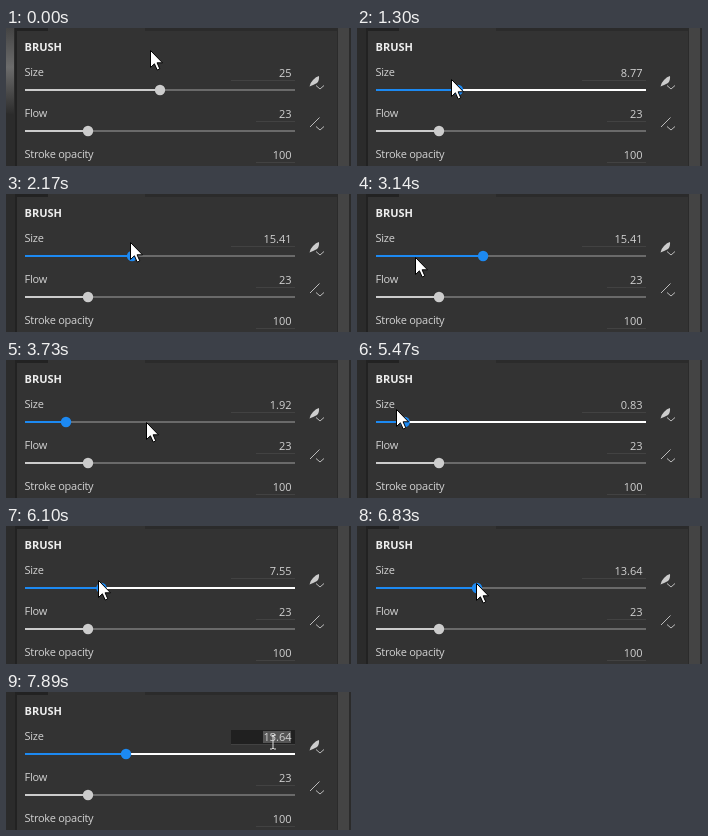
An HTML page for the animation above (8 s loop, 345x138 px).

```html
<!DOCTYPE html>
<html lang="en">
<head>
<meta charset="utf-8">
<title>Brush panel</title>
<style>
html, body { margin: 0; width: 100%; height: 100%; overflow: hidden; background: #333; }
svg { display: block; }
text { font: 11px "Open Sans", "Noto Sans", sans-serif; fill: #d2d2d2; }
.label { letter-spacing: -.25px; }
.title { font-weight: 700; fill: #eee; }
.value { text-anchor: end; }
.line { fill: none; stroke: #bbb; }
</style>
</head>
<body>
<svg width="345" height="138" viewBox="0 0 345 138">
  <defs>
    <linearGradient id="glow" x2="0" y2="1">
      <stop offset="0" stop-color="#444"/>
      <stop offset=".45" stop-color="#6c6c6c"/>
      <stop offset="1" stop-color="#2b2b2b"/>
    </linearGradient>
  </defs>
  <rect width="345" height="138" fill="#333"/>
  <rect width="9" height="138" fill="#2b2b2b"/>
  <path id="view" d="M0 0h8v87l-8-2z" fill="url(#glow)"/>
  <path d="M9 0h2v138h-2zM11 0h31v3h-31z" fill="#222"/>
  <path d="M139 0h193v3h-193zM331 0h14v138h-14z" fill="#2b2b2b"/>
  <rect x="332" width="11" height="138" fill="#444"/>

  <text class="title" x="18.5" y="23">BRUSH</text>
  <text class="label" x="18.5" y="48">Size</text>
  <text class="label" x="18.5" y="89">Flow</text>
  <text class="label" x="18.5" y="130">Stroke opacity</text>
  <path d="M225 52.5h64M250 93.5h39M250 134.5h39" stroke="#424242"/>

  <g id="field">
    <rect x="225" y="38" width="64" height="14" fill="#202020"/>
    <rect x="257" y="39" width="28" height="12" fill="#555"/>
  </g>
  <text class="value" id="size" x="285.5" y="49"></text>
  <text class="value" x="285.5" y="90">23</text>
  <text class="value" x="285.5" y="131">100</text>
  <path id="caret" d="M285.5 38v13" stroke="#ddd"/>

  <rect id="track" x="19" y="61" width="270" height="2"/>
  <rect id="fill" x="19" y="61" height="2"/>
  <circle id="knob" cy="62" r="5.2"/>
  <rect x="19" y="102" width="270" height="2" fill="#6a6a6a"/>
  <rect x="19" y="102" width="63" height="2" fill="#ccc"/>
  <circle cx="82" cy="103" r="5.2" fill="#ccc"/>

  <path d="M303.5 58.5q.5-3.5 3.5-6.5q3-3.5 6-4q.5 4.500-2 7q-3 1.500-7.500 3.500z" fill="#ccc"/>
  <path class="line" d="M310 57.500l4 3.500 4-3.500M304 99l9.500-9.500M310 98.500l4 3.500 4-3.500"/>

  <path id="arrow" d="M.5.5V17.500L4.400 13.800L7.200 20L9.800 18.900L7.100 12.800H12.500Z" fill="#fff" stroke="#000"/>
  <path id="beam" d="M-3-7h2l1 1 1-1h2M0-6V6M-3 7h2l1-1 1 1h2" fill="none" stroke="#ddd"/>
</svg>
<script>
const LOOP = 8000, STEP = 90, HOVER = 700, EDIT = 7610, BLINK = 280;
const gestures = [{ start: 0, steps: 1, x: 144, y: 22, part: .5, pressed: false }];

// Each gesture starts from the pose the last one left; the size grows with the square of the knob's place.
function add(start, steps, change) {
  gestures.push({ ...gestures.at(-1), pressed: false, start, steps, ...change });
}
const move = (start, steps, x, y) => add(start, steps, { x, y });
const release = start => add(start, 1, {});
const drag = (start, steps, x, y, size) =>
  add(start, steps, { x, y, part: Math.sqrt(size) / 10, pressed: true });

move(520, 5, 146, 47);
drag(1120, 6, 41, 54, .85);
drag(1720, 5, 124, 48, 15.41);
release(2170);
move(2230, 4, 111, 56);
move(2590, 7, 58, 63);
drag(3220, 1, 59, 62, 1.92);
release(3310);
move(3490, 5, 194, 62);
drag(4170, 1, 194, 62, 44.33);
release(4260);
move(4690, 1, 183, 61);
drag(4780, 8, 39, 49, .83);
drag(5560, 3, 27, 51, .12);
drag(5830, 6, 125, 55, 15.6);
drag(6370, 3, 119, 57, 13.64);
release(6830);
move(6920, 6, 267, 50);

const $ = id => document.getElementById(id);
const set = (id, name, value) => $(id).setAttribute(name, value);
const show = (id, on) => set(id, "visibility", on ? "visible" : "hidden");

function pose(t) {
  const i = gestures.findLastIndex(g => g.start <= t);
  const to = gestures[i], from = gestures[Math.max(0, i - 1)];
  const done = Math.min(1, (Math.floor((t - to.start) / STEP) + 1) / to.steps);
  const mix = key => from[key] + (to[key] - from[key]) * done;
  return { x: mix("x"), y: mix("y"), part: mix("part"), pressed: to.pressed };
}

function draw(now) {
  const t = now % LOOP;
  const { x, y, part, pressed } = pose(t);
  const knobX = 24 + 260 * part;
  const color = t >= HOVER ? "#1c89f2" : "#ccc";
  const editing = t >= EDIT, overField = x > 225;

  $("size").textContent = +(100 * part * part).toFixed(2);
  set("knob", "cx", knobX);
  set("knob", "fill", color);
  set("fill", "width", knobX - 19);
  set("fill", "fill", color);
  set("track", "fill", pressed || editing ? "#fff" : "#6a6a6a");
  show("view", t < 1120);
  show("field", editing);
  show("caret", editing && t < EDIT + BLINK);
  show("arrow", !overField);
  show("beam", overField);
  for (const id of ["arrow", "beam"])
    set(id, "transform", `translate(${Math.round(x)} ${Math.round(y)})`);
  requestAnimationFrame(draw);
}
requestAnimationFrame(draw);
</script>
</body>
</html>
```
